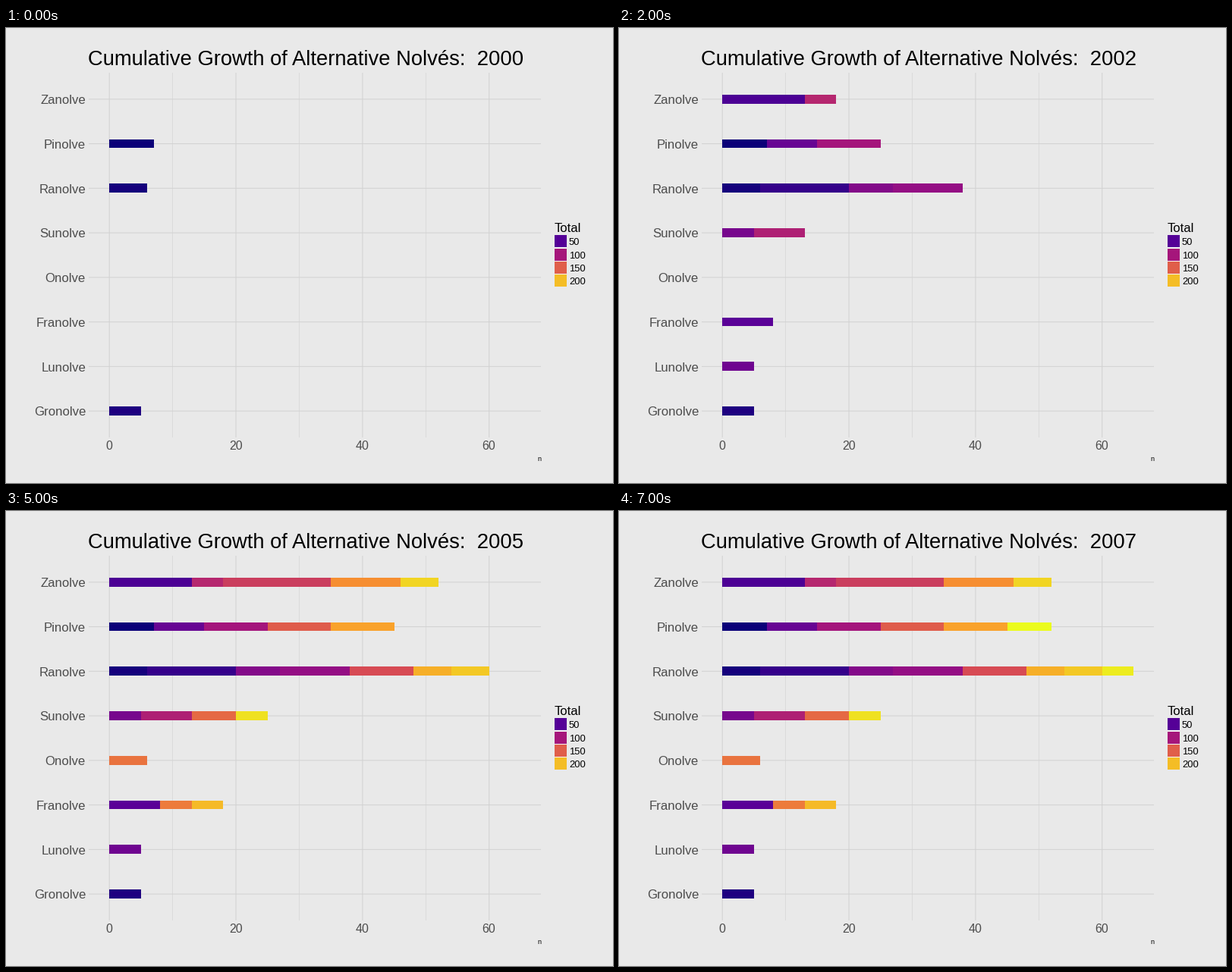
Animation, 800 px wide and 600 px high, one loop 8 s. Source, as a matplotlib script:

```python
import matplotlib.pyplot as plt
from matplotlib.animation import FuncAnimation
from matplotlib.colors import LinearSegmentedColormap
from matplotlib.patches import Rectangle

W, H, DPI = 800, 600, 100
PT = 72 / DPI  # points per pixel
BG, GRID, GREY = "#e9e9e9", "#d2d2d2", "#4d4d4d"
X0, UNIT = 136.2, 8.342
Y0, STEP, BAR = 93.85, 58.75, 11.75
LEFT, RIGHT, TOP, BOTTOM = 109, 705, 59, 540
FIRST_YEAR, N_YEARS = 2000, 8

# Yearly gains of each name, starting with the first year, from top to bottom
GAINS = {
    "Zanolve": [0, 13, 5, 17, 11, 6],
    "Pinolve": [7, 8, 10, 10, 10, 0, 0, 7],
    "Ranolve": [6, 14, 11, 10, 6, 6, 5],
    "Sunolve": [0, 5, 8, 7, 0, 5],
    "Onolve": [0, 0, 0, 6],
    "Franolve": [0, 8, 0, 5, 5],
    "Lunolve": [0, 5],
    "Gronolve": [5],
}
NAMES = list(GAINS)
LATE_GAINS = {"Ranolve": [0, 7]}  # counted after all others of the year

LOW, HIGH = 7, 228
cmap = LinearSegmentedColormap.from_list(
    "total", ["#0b0078", "#570098", "#9f1080", "#d84c53", "#fa982c", "#ebfb1d"],
    N=512)

plt.rcParams["font.family"] = "Liberation Sans"
fig = plt.figure(figsize=(W / DPI, H / DPI), dpi=DPI, facecolor=BG)
ax = fig.add_axes([0, 0, 1, 1])
ax.set_xlim(0, W)
ax.set_ylim(H, 0)
ax.axis("off")


def x_at(n):
    return X0 + UNIT * n


def y_at(row):
    return Y0 + STEP * row


def shade(total):
    return cmap((total - LOW) / (HIGH - LOW))


def box(x1, y1, x2, y2, color):
    return ax.add_patch(Rectangle((x1, y1), x2 - x1, y2 - y1, color=color,
                                  lw=0, antialiased=False, zorder=3))


def label(x, y, text, size, color="black", ha="left"):
    return ax.text(x, y, text, fontsize=size * PT, color=color, ha=ha,
                   va="baseline", zorder=4)


def line(xs, ys, width):
    ax.plot(xs, ys, color=GRID, lw=width * PT, solid_capstyle="butt",
            snap=False, zorder=1)


def draw_axes():
    for n in range(0, 70, 10):
        major = n % 20 == 0
        line([x_at(n)] * 2, [TOP, BOTTOM], 1 if major else 0.6)
        if major:
            label(x_at(n) - 0.2, 556, str(n), 16, GREY, "center")
    for row, name in enumerate(NAMES):
        line([LEFT, RIGHT], [y_at(row)] * 2, 1)
        label(105, y_at(row) + 6.2, name, 16.7, GREY, "right")
    label(705.5, 571, "n", 9, "black", "right")


def draw_legend():
    label(723, 269, "Total", 16.6)
    box(723, 273, 739, 341, "#f5f5f5")
    for i in range(4):
        total, y = 50 * (i + 1), round(273.3 + 17.28 * i)
        box(723, y, 739, y + 16, shade(total))
        label(742, y + 13.3, str(total), 13)


def year_gains(gains, year):
    """Rows that grow in a year, largest gain first, ties from the bottom."""
    grown = [(g[year], NAMES.index(name)) for name, g in gains.items()
             if year < len(g) and g[year]]
    return sorted(grown, reverse=True)


def draw_bars():
    """Stack all segments, coloured by running total; one list per year."""
    ends, total, groups = [0] * len(NAMES), 0, []
    for year in range(N_YEARS):
        group = []
        for n, row in year_gains(GAINS, year) + year_gains(LATE_GAINS, year):
            total += n
            start, end = ends[row], ends[row] + n
            group.append(box(round(x_at(start)), round(y_at(row) - BAR / 2),
                             round(x_at(end)), round(y_at(row) + BAR / 2),
                             shade(total)))
            ends[row] = end
        groups.append(group)
    return groups


draw_axes()
draw_legend()
bars = draw_bars()
title = label(108, 49, "", 27.4)


def update(i):
    title.set_text(f"Cumulative Growth of Alternative Nolvés:  {FIRST_YEAR + i}")
    for year, group in enumerate(bars):
        for bar in group:
            bar.set_visible(year <= i)
    return [title]


anim = FuncAnimation(fig, update, frames=N_YEARS, interval=1000,
                     repeat=True, repeat_delay=0)
plt.show()
```
